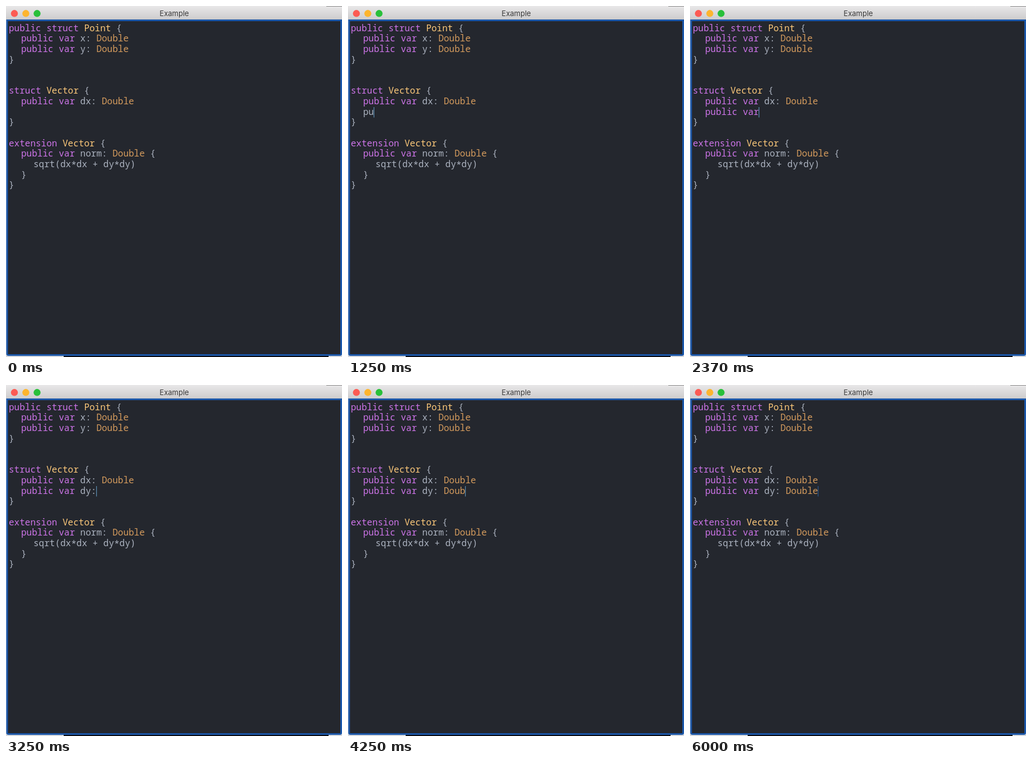
An HTML page that plays this animation: 600x625 px, repeating every 6130 ms.

```html
<!DOCTYPE html>
<html lang="en">
<head>
<meta charset="utf-8">
<title>Example</title>
<style>
  html, body { margin: 0; width: 100%; height: 100%; overflow: hidden; background: #dcdcdc; }
  svg { display: block; width: 600px; height: 625px; }
  .title { font: 13px Inter, "Open Sans", sans-serif; fill: #3b3b3b; text-anchor: middle; }
  .code { font: 16px "Noto Sans Mono", "DejaVu Sans Mono", monospace; fill: #abb2bf; }
</style>
</head>
<body>
<svg viewBox="0 0 600 625">
  <defs>
    <linearGradient id="bar" x2="0" y2="1">
      <stop offset="0" stop-color="#e8e7e8"/>
      <stop offset="1" stop-color="#cdcccd"/>
    </linearGradient>
  </defs>
  <rect width="600" height="625" fill="#d6d8dc"/>
  <rect x="103" y="622" width="473" height="3" fill="#0b0d14"/>
  <rect width="600" height="24" fill="url(#bar)"/>
  <rect x="572" width="28" height="1" fill="#8b8b8b"/>
  <circle cx="15" cy="13.3" r="6.2" fill="#fc5b53"/>
  <circle cx="35.4" cy="13.3" r="6.2" fill="#fdb52e"/>
  <circle cx="55.5" cy="13.3" r="6.2" fill="#28c03a"/>
  <text class="title" x="300.5" y="18">Example</text>
  <path d="M.5 24H600V619Q600 623 596 623H4.5Q.5 623 .5 619Z" fill="#1b57a9"/>
  <rect x="3.5" y="27" width="593.5" height="593" fill="#24272e"/>
  <g class="code" id="listing"></g>
  <g class="code" id="typed"></g>
  <rect id="caret" y="180" width="1.2" height="18.5"/>
</svg>
<script>
const LOOP = 6130;
const CHAR = 9.6, INDENT = 22, LEFT = 5, TOP = 44.6, LINE = 18.64;
const TYPED_ROW = 8;
const PHRASE = "public var dy: Double";

// Time at which each character of PHRASE appears
const KEY_TIMES = [
  1120, 1250, 1370, 1500, 1620, 1750, 1870, 2000, 2120, 2250,
  2500, 2750, 2870, 3120, 3370, 3620, 3870, 4000, 4250, 4370, 4500
];

const LINES = [
  "public struct Point {",
  "\tpublic var x: Double",
  "\tpublic var y: Double",
  "}", "", "",
  "struct Vector {",
  "\tpublic var dx: Double",
  "",
  "}", "",
  "extension Vector {",
  "\tpublic var norm: Double {",
  "\t\tsqrt(dx*dx + dy*dy)",
  "\t}",
  "}"
];

const listing = document.getElementById("listing");
const typed = document.getElementById("typed");
const caret = document.getElementById("caret");

function colorOf(word) {
  if (/^(public|struct|var|extension)$/.test(word)) return "#cd74e8";
  if (/^(Point|Vector)$/.test(word)) return "#fcc87a";
  return /^[A-Z]/.test(word) ? "#d49b5d" : "#abb2bf";
}

function codeLine(text, row) {
  const tabs = text.match(/^\t*/)[0].length;
  const body = text.slice(tabs);
  const left = LEFT + tabs * INDENT;
  const y = TOP + row * LINE;
  return [...body.matchAll(/[A-Za-z]+|[^\sA-Za-z]/g)].map(m => {
    const drop = m[0] === "*" ? 2.5 : 0;
    return `<text x="${left + m.index * CHAR}" y="${y + drop}" fill="${colorOf(m[0])}">${m[0]}</text>`;
  }).join("");
}

function caretVisible(t) {
  if (t < 1120) return t >= 500;
  return t < 5250 || t >= 5750;
}

let shown = -1;
function render(t) {
  const count = KEY_TIMES.filter(k => k <= t).length;
  if (count !== shown) {
    typed.innerHTML = codeLine("\t" + PHRASE.slice(0, count), TYPED_ROW);
    shown = count;
  }
  caret.setAttribute("x", LEFT + INDENT + count * CHAR - 0.4);
  caret.setAttribute("fill", t >= 5000 || t < 1120 ? "#2a588f" : "#5c8fb5");
  caret.setAttribute("visibility", caretVisible(t) ? "visible" : "hidden");
}

listing.innerHTML = LINES.map(codeLine).join("");

const start = performance.now();
function tick() {
  render((performance.now() - start) % LOOP);
  requestAnimationFrame(tick);
}
render(0);
requestAnimationFrame(tick);
</script>
</body>
</html>
```
